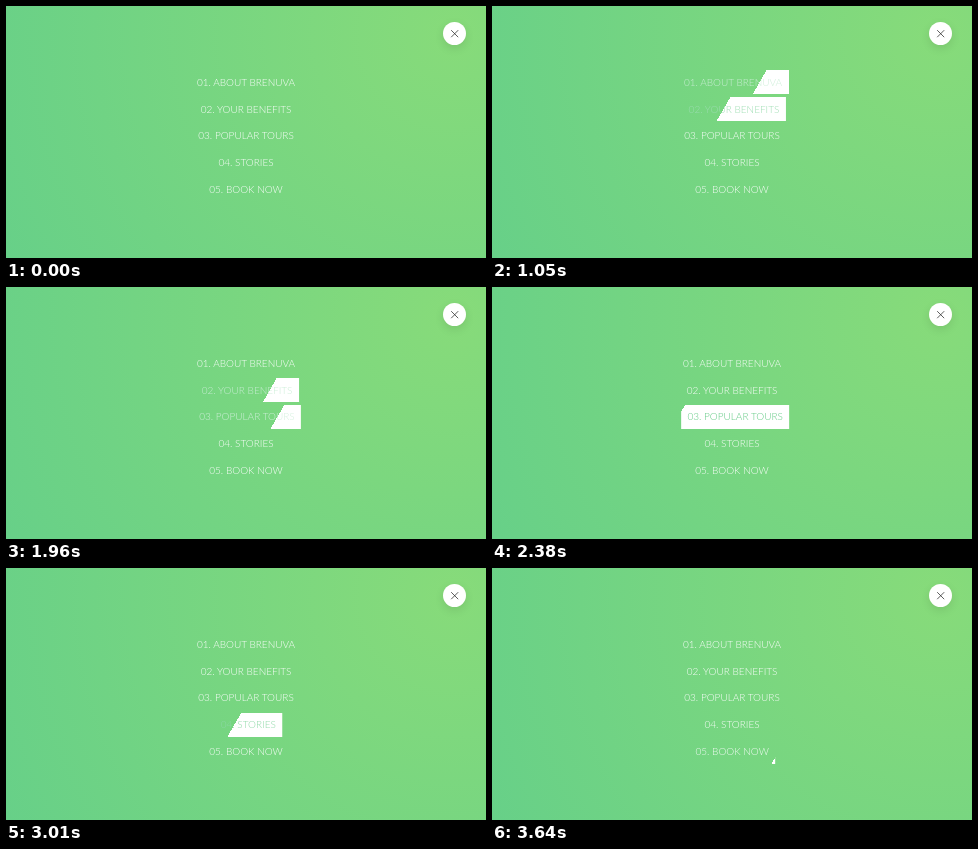
An HTML page that plays this animation: 480x253 px, repeating every 3.71 s.

```html
<!DOCTYPE html>
<html lang="en">
<head>
<meta charset="utf-8">
<title>Menu</title>
<style>
  html, body { margin: 0; width: 100%; height: 100%; overflow: hidden; }
  body {
    position: relative;
    background: radial-gradient(circle at 448px 28px, rgb(135, 219, 122), rgb(103, 208, 136) 500px);
  }
  ul {
    position: absolute; left: 0; top: 64.2px; width: 480px;
    margin: 0; padding: 0; list-style: none;
    display: flex; flex-direction: column; align-items: center; gap: 3.33px;
  }
  li {
    padding: 3.33px 6.67px;
    font: 300 10px/17px Lato, sans-serif;
    white-space: nowrap; text-transform: uppercase;
    background: linear-gradient(120deg, transparent 50%, #fff 50%) 0 0 / 220% 100%;
  }
  .close {
    position: absolute; left: 436.8px; top: 16px; width: 23.4px; height: 23.4px;
    border-radius: 50%; background: #fff;
    box-shadow: 0 3.3px 10px rgba(0, 0, 0, .1);
  }
  .close svg { display: block; width: 100%; height: 100%; }
  .floor { position: absolute; left: 0; top: 252px; width: 100%; height: 1px; background: #000; }
</style>
</head>
<body>
<ul>
  <li>01. About Brenuva</li>
  <li>02. Your benefits</li>
  <li>03. Popular tours</li>
  <li>04. Stories</li>
  <li>05. Book now</li>
</ul>
<div class="close">
  <svg viewBox="-11.7 -11.7 23.4 23.4">
    <path d="M-3.5-3.5 3.5 3.5M-3.5 3.5 3.5-3.5" stroke="#333" stroke-width=".8"/>
  </svg>
</div>
<div class="floor"></div>
<script>
  const LOOP = 3710, STEP = 70, FADE = 400, SHIFT = 3.33;

  // Pointer enter and leave times per item, with an optional fade-out length
  const hovers = [
    [105, 885],
    [915, 1800],
    [1885, 2352],
    [2446, 2925],
    [3028, 3440, 280],
  ];
  const items = [...document.querySelectorAll('li')];

  const bezier = (a, b, u) => 3 * a * u * (1 - u) ** 2 + 3 * b * u * u * (1 - u) + u ** 3;

  // The CSS "ease" curve, solved by bisection
  function ease(x) {
    if (x <= 0) return 0;
    if (x >= 1) return 1;
    let lo = 0, hi = 1;
    for (let i = 0; i < 24; i++) {
      const mid = (lo + hi) / 2;
      if (bezier(.25, .25, mid) < x) lo = mid; else hi = mid;
    }
    return bezier(.1, 1, lo);
  }

  function draw(t) {
    hovers.forEach(([enter, leave, fadeOut = FADE], i) => {
      const p = ease((t - enter) / FADE) * (1 - ease((t - leave) / fadeOut));
      const style = items[i].style;
      style.backgroundPosition = `${p * 100}% 0`;
      style.transform = `translateX(${p * SHIFT}px)`;
      style.color = `color-mix(in srgb, #55c57a ${p * 100}%, #fff)`;
    });
  }

  const start = performance.now();
  function tick() {
    const t = (performance.now() - start) % LOOP;
    draw(Math.floor(t / STEP) * STEP);
    requestAnimationFrame(tick);
  }
  tick();
</script>
</body>
</html>
```
